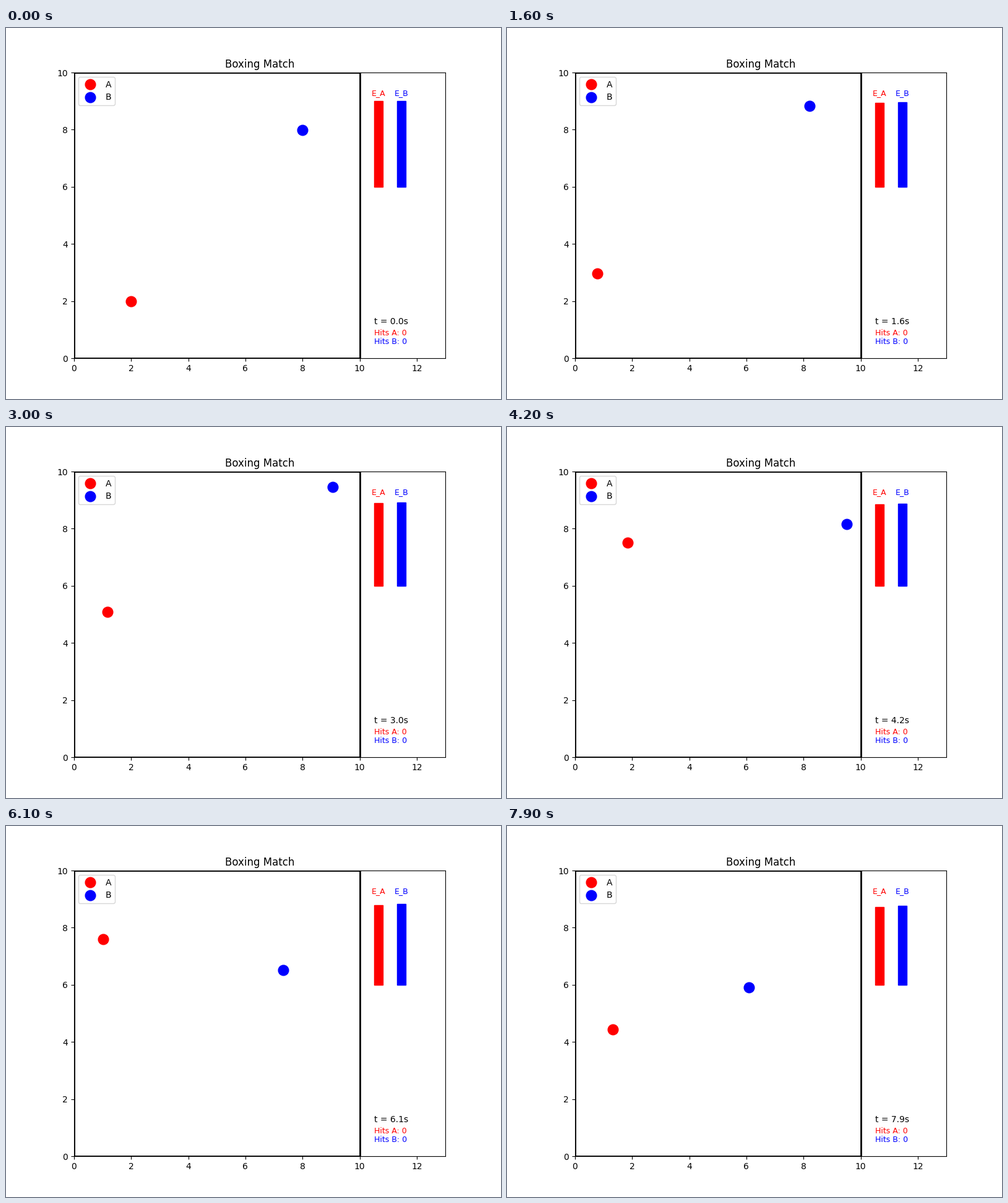
Recreate the animation shown at these times as a matplotlib script. Size 800 by 600 pixels, loop 8000 ms.

```python
import numpy as np
import matplotlib.pyplot as plt
from matplotlib.animation import FuncAnimation
from matplotlib.patches import Rectangle

FRAMES, STEP = 80, 0.1
RING, BAR = 10, 3

# name: colour, bar x, hits y, bar height lost per second
FIGHTERS = {"A": ("red", 10.5, 0.8, 0.0362), "B": ("blue", 11.3, 0.5, 0.0292)}

# Key poses: time, A x, A y, B x, B y, unfolded as if the walls were absent
POSES = np.array([
    (0.0, 2.00, 2.00, 8.00, 7.985),
    (1.6, 0.775, 2.96, 8.22, 8.825),
    (2.7, -0.72, 4.57, 8.81, 10.2),
    (3.0, -1.185, 5.08, 9.06, 10.547),
    (4.2, -1.853, 7.51, 10.487, 11.846),
    (5.4, -1.615, 10.59, 11.892, 12.883),
    (6.9, -0.078, 14.184, 13.406, 14.01),
    (7.9, 1.333, 15.567, 13.904, 14.097),
])
TIMES, POINTS = POSES[:, 0], POSES[:, 1:]
SPEEDS = np.gradient(POINTS, TIMES, axis=0, edge_order=2)


def glide(t):
    """Cubic Hermite curve through the key poses."""
    i = min(np.searchsorted(TIMES, t, side="right"), len(TIMES) - 1) - 1
    h = TIMES[i + 1] - TIMES[i]
    s = (t - TIMES[i]) / h
    ease = s * s * (3 - 2 * s)
    swing = s * (1 - s) * ((1 - s) * SPEEDS[i] - s * SPEEDS[i + 1])
    return POINTS[i] + ease * (POINTS[i + 1] - POINTS[i]) + h * swing


def bounce(u):
    """Reflect unfolded coordinates at the ring walls."""
    return RING - np.abs(u % (2 * RING) - RING)


fig, ax = plt.subplots(figsize=(8, 6), dpi=100)
ax.set_xlim(0, 13)
ax.set_ylim(0, RING)
ax.set_aspect("equal")
ax.set_title("Boxing Match")
ax.add_patch(Rectangle((0, 0), RING, RING, fill=False, lw=2))

balls, bars, drains = [], [], []
for name, (color, x, hits_y, drain) in FIGHTERS.items():
    balls += ax.plot([], [], "o", color=color, ms=12, label=name)
    bars.append(ax.add_patch(Rectangle((x, 6), 0.3, BAR, color=color)))
    drains.append(drain)
    ax.text(x + 0.15, 9.2, f"E_{name}", color=color, fontsize=9, ha="center")
    ax.text(10.5, hits_y, f"Hits {name}: 0", color=color, fontsize=9)
clock = ax.text(10.5, 1.2, "", fontsize=10)
ax.legend(loc="upper left")


def update(frame):
    t = frame * STEP
    spots = bounce(glide(t)).reshape(2, 2)
    for ball, bar, drain, (x, y) in zip(balls, bars, drains, spots):
        ball.set_data([x], [y])
        bar.set_height(BAR - drain * t)
    clock.set_text(f"t = {t:.1f}s")
    return [*balls, *bars, clock]


anim = FuncAnimation(fig, update, frames=FRAMES, interval=100,
                     init_func=lambda: update(0), repeat=True, repeat_delay=0)
plt.show()
```
